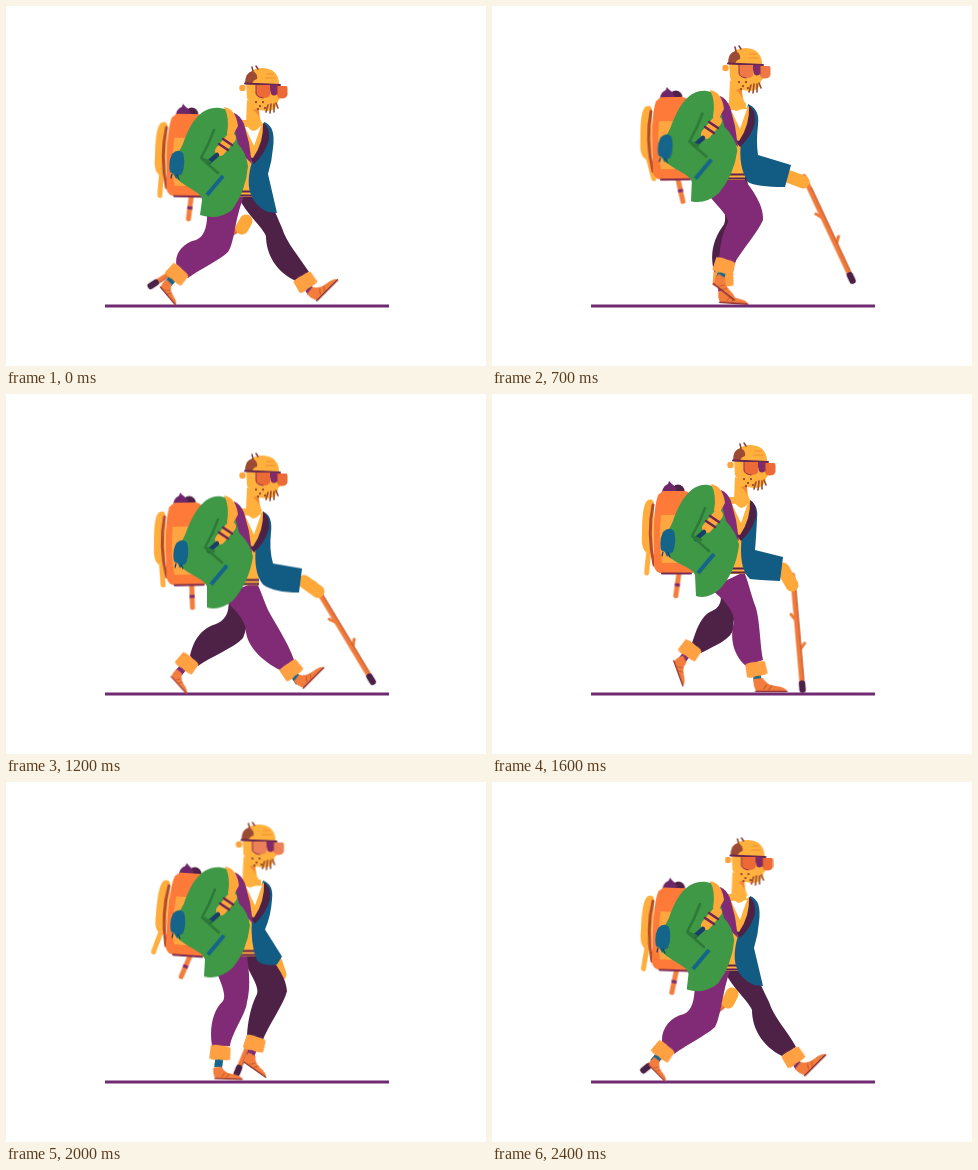
An HTML page without scripts that plays this animation: 480x360 px, repeating every 2500 ms.

```html
<!DOCTYPE html>
<html lang="en">
<head>
<meta charset="utf-8">
<title>Walking hiker</title>
<style>
html, body { margin: 0; width: 100%; height: 100%; overflow: hidden; background: #fff; }
svg { display: block; width: 100vw; height: 100vh; }

/* Motion is held for 100 ms per drawing: steps(n) spans n drawings. */
.a { animation: 2500ms steps(4) infinite; }
.body { animation-name: bob; }
.head { animation-name: head; }
.lens { animation-name: glint; }
.pack { animation-name: pack; transform-origin: 185px 150px; transform: rotate(1deg); }
.strap { animation-name: strap; transform: rotate(6deg); }
.coat { animation-name: coat; }
.trim { animation-name: trim; }
.arm { animation-name: arm; }
.hand { animation-name: hand; }
.cane { animation-name: cane; transform: translate(237px,220px) rotate(57deg); }
.near-leg { animation-name: near-leg; }
.near-cuff { animation-name: near-cuff; transform: translate(171px,268px) rotate(43deg); }
.near-shoe { animation-name: near-shoe; transform: translate(-1px,13px) rotate(7deg) scale(.77); }
.far-leg { animation-name: far-leg; }
.far-cuff { animation-name: far-cuff; transform: translate(299px,276px) rotate(-30deg); }
.far-shoe { animation-name: far-shoe; transform: translate(0,12px) rotate(-15deg) scale(.95); }

@keyframes bob {
  16% { transform: translate(0,-13.5px); animation-timing-function: steps(3); }
  28% { transform: translate(0,-17px); animation-timing-function: steps(2); }
  36% { transform: translate(0,-11px); animation-timing-function: steps(3); }
  48% { transform: translate(0,.5px); }
  64% { transform: translate(1px,-11px); animation-timing-function: steps(2); }
  72% { transform: translate(1px,-15.5px); animation-timing-function: steps(2); }
  80% { transform: translate(1px,-16.5px); }
  96% { transform: translate(0,-2px); animation-timing-function: steps(1); }
}
@keyframes head {
  16% { transform: translate(1px,0); animation-timing-function: steps(3); }
  28% { transform: translate(-3px,-3px); animation-timing-function: steps(2); }
  36% { transform: translate(-3.5px,-2px); animation-timing-function: steps(3); }
  48% { transform: translate(0,-1px); }
  64% { transform: translate(1px,0); }
  80% { transform: translate(-4.5px,-3px); }
  96% { transform: translate(-.5px,-2px); animation-timing-function: steps(1); }
}
@keyframes glint {
  16% { fill: #ec9468; animation-timing-function: steps(5); }
  36% { fill: #f0662f; animation-timing-function: steps(3); }
  48%, 64% { fill: #ec6a35; }
  80% { fill: #ec8058; }
  96% { fill: #ec6a35; animation-timing-function: steps(1); }
}
@keyframes pack {
  16% { transform: rotate(1deg); animation-timing-function: steps(5); }
  36% { transform: translate(-1px,0) rotate(-2deg); animation-timing-function: steps(3); }
  48% { transform: translate(-1px,0) rotate(-1deg); }
  64% { transform: rotate(0deg); }
  80% { transform: rotate(4deg); }
  96% { transform: rotate(2deg); animation-timing-function: steps(1); }
}
@keyframes strap {
  16% { transform: rotate(-5deg); animation-timing-function: steps(5); }
  36% { transform: rotate(-16deg); animation-timing-function: steps(3); }
  48% { transform: rotate(-1deg); }
  64% { transform: rotate(8deg); }
  80% { transform: rotate(19deg); }
  96% { transform: rotate(10deg); animation-timing-function: steps(1); }
}
@keyframes coat {
  16% { d: path("M214,102C194,100 184,118 177,138C170,152 160,162 170,172C180,182 197,186 198,194L196,211Q212,214 226,202Q240,185 243,160Q241,146 232,138L224,104Z"); animation-timing-function: steps(5); }
  36%, 48% { d: path("M215,102C198,100 188,118 180,138C174,152 166,162 175,172C185,182 198,184 201,192L201,213Q213,217 227,206Q243,188 247,162Q245,150 233,138L224,104Z"); animation-timing-function: steps(3); }
  64% { d: path("M215,102C198,100 187,118 180,138C174,152 166,162 174,172C184,182 199,184 202,192L203,213Q214,217 227,206Q243,188 246,162Q244,150 233,138L224,104Z"); }
  80% { d: path("M214,102C194,100 184,118 177,138C170,152 160,162 170,172C180,182 196,186 198,194L197,211Q212,215 226,202Q240,185 243,160Q241,146 232,138L224,104Z"); }
}
@keyframes trim {
  16% { transform: none; animation-timing-function: steps(5); }
  36% { transform: translate(4px,1px); animation-timing-function: steps(3); }
  48%, 64% { transform: translate(4px,1px); }
  80% { transform: none; }
}
@keyframes arm {
  16% { d: path("M256,115Q268,120 267,136Q265,152 261,167L277,194L268,205Q258,206 254,198Q246,179 247,154Z"); animation-timing-function: steps(3); }
  28% { d: path("M256,115Q268,120 266,136Q264,152 266,166L299,176L293,198Q264,198 256,193Q246,178 249,152Z"); animation-timing-function: steps(2); }
  36% { d: path("M256,116Q266,119 265,136Q265,151 270,163L302,166L302,194Q268,193 257,191Q248,176 250,151Z"); animation-timing-function: steps(3); }
  48% { d: path("M256,117Q267,120 265,138Q263,155 267,169L296,174L293,198Q268,198 257,190Q247,178 250,150Z"); }
  64% { d: path("M255,117Q266,121 264,136Q263,156 262,167L290,174L287,198Q265,197 257,196Q245,186 249,151Z"); }
  80% { d: path("M256,115Q267,119 265,134Q264,150 258,164L275,191L270,199Q256,201 250,195Q243,178 245,151Z"); }
  96% { d: path("M258,116Q270,120 267,142Q266,155 262,168L271,206L262,205Q248,199 244,186Q240,172 248,150Z"); animation-timing-function: steps(1); }
}
@keyframes hand {
  16% { d: path("M270,200L270,214"); animation-timing-function: steps(3); }
  28% { d: path("M298,188L311,193"); animation-timing-function: steps(2); }
  36% { d: path("M305,180L320,185"); animation-timing-function: steps(3); }
  48% { d: path("M298,187L312,197"); }
  64% { d: path("M290,186L299,202"); }
  80% { d: path("M269,197L273,209"); }
  96% { d: path("M240,214L236,222"); animation-timing-function: steps(1); }
}
@keyframes cane {
  16% { transform: translate(270px,214px) rotate(44deg); animation-timing-function: steps(3); }
  28% { transform: translate(314px,192px) rotate(-25deg); animation-timing-function: steps(2); }
  36% { transform: translate(320px,186px) rotate(-43deg); animation-timing-function: steps(3); }
  48% { transform: translate(310px,193px) rotate(-31deg); }
  64% { transform: translate(300px,197px) rotate(-5deg); }
  80% { transform: translate(271px,206px) rotate(22deg); }
  96% { transform: translate(237px,221px) rotate(51deg); animation-timing-function: steps(1); }
}
@keyframes near-leg {
  16% { d: path("M208,180C212,200 222,208 218,215C198,222 192,238 196,246L206,257C222,246 244,238 249,228C255,215 245,190 240,165Z"); animation-timing-function: steps(3); }
  28% { d: path("M210,180C222,198 236,208 236,216C230,228 228,240 227,254L242,258C250,244 266,226 271,214C272,200 262,185 246,165Z"); animation-timing-function: steps(2); }
  36% { d: path("M212,194C228,206 251,210 253,221C251,240 256,256 270,264L288,254C284,240 276,222 272,211C266,198 256,186 246,176Z"); animation-timing-function: steps(3); }
  48% { d: path("M214,202C228,214 240,226 240,238C242,254 258,268 274,276L288,266C282,248 268,228 262,216C256,202 254,194 250,188Z"); }
  64% { d: path("M218,194C232,206 242,216 242,228C238,242 240,260 254,272L271,266C268,252 268,228 264,214C258,198 256,186 252,178Z"); }
  80% { d: path("M209,185C214,200 221,212 217,219C207,228 203,246 206,264L224,264C226,250 240,232 241,220C245,205 243,185 240,168Z"); animation-timing-function: steps(2); }
  88% { d: path("M204,190C206,208 208,216 204,222C190,230 184,246 186,260L198,268C208,256 226,244 232,232C238,220 238,200 240,178Z"); animation-timing-function: steps(2); }
  96% { d: path("M202,190C204,212 202,228 192,232C174,236 166,254 172,266L182,272C196,262 216,252 223,245C229,234 230,212 238,188Z"); animation-timing-function: steps(1); }
}
@keyframes near-cuff {
  16% { transform: translate(194px,254px) rotate(38deg); animation-timing-function: steps(3); }
  28% { transform: translate(232px,260px) rotate(18deg); animation-timing-function: steps(2); }
  36% { transform: translate(281px,265px) rotate(-25deg); animation-timing-function: steps(3); }
  48% { transform: translate(285px,276px) rotate(-34deg); }
  64% { transform: translate(264px,275px) rotate(-8deg); }
  80% { transform: translate(214px,270.5px) rotate(7deg); animation-timing-function: steps(2); }
  88% { transform: translate(188px,268px) rotate(30deg); animation-timing-function: steps(2); }
  96% { transform: translate(171px,269px) rotate(40deg); animation-timing-function: steps(1); }
}
@keyframes near-shoe {
  16% { transform: translate(0,12px) rotate(32deg) scale(.88); animation-timing-function: steps(3); }
  28% { transform: translate(0,12px) rotate(20deg) scale(.87); animation-timing-function: steps(2); }
  36% { transform: translate(0,12px) rotate(0deg) scale(1); animation-timing-function: steps(3); }
  48% { transform: translate(0,12px) rotate(-11deg) scale(.93); }
  64% { transform: translate(0,12px) rotate(8deg) scale(1); }
  80% { transform: translate(-1px,17px) rotate(-5deg) scale(.88); animation-timing-function: steps(2); }
  88% { transform: translate(-1px,14px) rotate(2deg) scale(.78); animation-timing-function: steps(2); }
  96% { transform: translate(0,12px) rotate(5deg) scale(.76); animation-timing-function: steps(1); }
}
@keyframes far-leg {
  16% { d: path("M232,166C238,186 252,200 250,214C244,232 244,252 260,270L279,268C276,252 278,236 274,210C272,196 266,180 252,165Z"); }
  32% { d: path("M224,180C228,200 230,212 226,220C214,232 208,248 210,266L228,266C232,250 248,232 250,220C252,205 254,190 256,172Z"); animation-timing-function: steps(1); }
  36% { d: path("M220,185C224,206 225,212 220,216C204,224 198,244 198,258L210,265C220,252 240,242 245,232C248,222 246,200 250,180Z"); animation-timing-function: steps(3); }
  48% { d: path("M222,200C224,215 222,225 210,230C190,236 186,254 184,262L192,272C206,262 228,254 237,244C242,234 242,215 250,190Z"); }
  64% { d: path("M226,196C232,204 228,214 220,217C208,222 204,238 200,249L209,259C222,252 238,246 241,236C242,220 246,200 250,180Z"); }
  80% { d: path("M236,172C242,190 254,204 251,212C244,226 242,240 241,253L257,258C262,244 278,222 281,209C280,196 272,184 258,168Z"); animation-timing-function: steps(2); }
  88% { d: path("M228,178C240,200 258,210 262,220C260,238 270,258 286,268L302,258C296,244 286,226 282,216C274,200 264,188 256,176Z"); animation-timing-function: steps(2); }
  96% { d: path("M232,188C240,206 256,218 260,228C260,246 270,264 290,274L304,265C296,250 281,234 277,220C268,202 264,190 256,182Z"); animation-timing-function: steps(1); }
}
@keyframes far-cuff {
  16% { transform: translate(270px,275px) rotate(-8deg); }
  32% { transform: translate(218px,272px) rotate(8deg); animation-timing-function: steps(1); }
  36% { transform: translate(197.5px,266.5px) rotate(28deg); animation-timing-function: steps(3); }
  48% { transform: translate(181px,269px) rotate(40deg); }
  64% { transform: translate(198px,256px) rotate(38deg); }
  80% { transform: translate(248.5px,261.5px) rotate(18deg); animation-timing-function: steps(2); }
  88% { transform: translate(296px,266px) rotate(-26deg); animation-timing-function: steps(2); }
  96% { transform: translate(301px,275px) rotate(-30deg); animation-timing-function: steps(1); }
}
@keyframes far-shoe {
  16% { transform: translate(0,12px) rotate(8deg) scale(1); }
  32% { transform: translate(0,15px) rotate(-3deg) scale(.88); animation-timing-function: steps(1); }
  36% { transform: translate(-2px,15px) rotate(4deg) scale(.8); animation-timing-function: steps(3); }
  48% { transform: translate(-1px,13px) rotate(8deg) scale(.74); }
  64% { transform: translate(0,12px) rotate(32deg) scale(.85); }
  80% { transform: translate(0,13px) rotate(17deg) scale(.85); animation-timing-function: steps(2); }
  88% { transform: translate(0,12px) rotate(-4deg) scale(1); animation-timing-function: steps(2); }
  96% { transform: translate(0,12px) rotate(-15deg) scale(.95); animation-timing-function: steps(1); }
}
</style>
</head>
<body>
<svg viewBox="0 0 480 360" fill="none" stroke-linecap="round" stroke-linejoin="round">
  <defs>
    <g id="cuff">
      <path d="M-10,-6Q-4,-8 1,-7Q7,-8 10,-6L11,6Q5,8 0,7Q-6,9 -10,7Z" fill="#ffa143"/>
    </g>
    <g id="shoe">
      <path d="M-4,-2L5,-3Q9,4 18,5Q28,6 30,11L-1,11Q-5,5 -4,-2Z" fill="#f27d3c"/>
      <path d="M-2,10.5H29" stroke="#8b3038" stroke-width="1.5"/>
      <path d="M9,4L6,8M14,5L11,9" stroke="#b54a2b"/>
    </g>
  </defs>

  <path d="M99,300H383" stroke="#712b73" stroke-width="3.2" stroke-linecap="butt"/>

  <g class="a body">
    <g class="a cane">
      <path d="M0,-5V104" stroke="#ef7a3a" stroke-width="5"/>
      <path d="M-1,40L-5,34M1,70L6,64" stroke="#ef7a3a" stroke-width="3"/>
      <path d="M2,8V100" stroke="#c4552d"/>
      <path d="M0,104V110" stroke="#4c2147" stroke-width="6.5"/>
    </g>
    <path class="a hand" d="M240,215L236,222" stroke="#ffa83a" stroke-width="13"/>
  </g>

  <path class="a far-leg" fill="#4e2147" d="M232,190C240,208 256,220 260,230C260,248 270,266 290,275L303,266C294,252 280,236 276,222C268,204 264,192 256,184Z"/>
  <g class="a far-cuff">
    <path d="M0,6V13" stroke="#7c2a72" stroke-width="8" stroke-linecap="butt"/>
    <use href="#shoe" class="a far-shoe"/>
    <use href="#cuff"/>
  </g>

  <path class="a near-leg" fill="#812a75" d="M200,195C203,215 200,230 190,234C172,238 165,256 174,266L182,272C196,262 214,254 222,246C229,236 228,215 238,190Z"/>
  <g class="a near-cuff">
    <path d="M0,6V15" stroke="#15658a" stroke-width="8" stroke-linecap="butt"/>
    <use href="#shoe" class="a near-shoe"/>
    <use href="#cuff"/>
  </g>

  <g class="a body">
    <g class="a pack">
      <g transform="translate(186 190)">
        <g class="a strap">
          <path d="M0,0V23" stroke="#f27d3c" stroke-width="5"/>
          <path d="M-2.5,12H2.5" stroke="#7c2a72" stroke-width="3" stroke-linecap="butt"/>
        </g>
      </g>
      <g transform="translate(156 166)">
        <path class="a strap" d="M0,0L1,24" stroke="#ffad3d" stroke-width="5"/>
      </g>
      <path d="M155,117Q161,115 161,122L160,170Q155,172 151,167Q148,162 149,150Q149,120 155,117Z" fill="#ffad3d"/>
      <path d="M160,122Q154,150 161,182" stroke="#b44b2c" stroke-width="3"/>
      <circle cx="185" cy="108" r="6.500" fill="#4e2147"/>
      <path d="M169,109Q170,103 175,101L176,98L179,101Q184,104 184,110Z" fill="#6d2668"/>
      <path d="M170,108H192Q200,110 200,120V190H167Q160,188 161,178Q159,130 165,112Z" fill="#fd7a38"/>
      <path d="M168,132H190V180H169Q165,160 168,132Z" fill="#ffa640"/>
      <path d="M169,190.500H198" stroke="#7c2a50" stroke-width="2"/>
    </g>

    <!-- shirt, far side of the coat -->
    <path d="M230,114L254,114L253,191H229Z" fill="#ffb03d"/>
    <path d="M229,185.500H253M229,189.500H253" stroke="#5d2350" stroke-width="1.800" stroke-linecap="butt"/>
    <path class="a arm" fill="#125c84" d="M258,116Q270,120 267,142Q266,155 262,168L271,207L262,206Q248,200 244,186Q240,172 248,150Z"/>
    <path d="M257,117Q264,120 263,134Q259,148 248,158L244,153Q254,144 257,117Z" fill="#4e2147"/>
    <path d="M250,122L257,117Q258,136 247,152L242,150Z" fill="#ffb03d"/>
    <path d="M239,121L255,120L248,140Z" fill="#fff"/>

    <g class="a head">
      <path d="M241,94L253,100Q253,112 256,117Q253,124 247,125Q241,122 240,117Z" fill="#ffb03d"/>
      <path d="M247,104Q252,108 253,112L253,102Z" fill="#f58a34"/>
      <path d="M240,74Q243,62 257,62Q272,63 273,77L274,86Q276,92 272,95Q271,105 260,105Q246,104 241,92Z" fill="#ffb03d"/>
      <path d="M239,78Q239,66 247,65Q252,68 251,73Q247,74 246,78Z" fill="#9b4a33"/>
      <path d="M247,65L246,61M252,63L250,60" stroke="#8c3c3c" stroke-width="1.500"/>
      <path d="M261,68H267M260,72H269" stroke="#f18c32"/>
      <circle cx="236.500" cy="82" r="3.200" fill="#ffa23a"/>
      <path d="M239,77.500L274,79" stroke="#67264f" stroke-width="2"/>
      <path d="M263,79H271V88Q268,91 265,88Z" fill="#802b68"/>
      <g class="a lens" fill="#ec6a35">
        <path d="M250,79H264V89Q263,92 257,92Q250,91 250,87Z"/>
        <path d="M271,80H280Q281.500,80 281.500,83V89Q280,93 275,92.500Q271,92 271,88Z"/>
      </g>
      <path d="M250,79V87Q250,91 257,92M271,80V88" stroke="#8b3050"/>
      <path d="M250,96v.1M254,100v.1M257,96v.1M252,103v.1M259,102v.1" stroke="#8b4430" stroke-width="2.200"/>
      <path d="M262,99L260,106M265,98L264,107M268,98V106M270,97L272,102" stroke="#9b4a2c" stroke-width="1.600"/>
    </g>

    <!-- near side of the coat and arm -->
    <path d="M228,107Q234,109 238,118L243,137L246,158L228,140Z" fill="#812a75"/>
    <path class="a coat" fill="#3f9846" d="M214,102C194,100 184,118 177,138C170,152 160,162 170,172C180,182 196,186 196,194L194,209Q212,215 226,204Q240,185 242,160Q240,146 232,138L224,104Z"/>
    <path d="M218,101Q230,103 232,120L226,131L221,128Q224,112 218,101Z" fill="#ffa83a"/>
    <path d="M225,132L214,145" stroke="#ffa83a" stroke-width="10"/>
    <path d="M217,133L226,139M213,138L222,144" stroke="#6b2456" stroke-width="2.500"/>
    <path d="M203,156L211,149" stroke="#173f68" stroke-width="4.500"/>
    <g class="a trim">
      <path d="M208,124Q203,138 195,152L204,156M196,153L212,167" stroke="#2d7a38" stroke-width="2.500"/>
      <path d="M201,189L217,170" stroke="#15658a" stroke-width="4" stroke-linecap="butt"/>
      <path d="M166,148Q172,142 177,147Q180,158 176,168L172,170L170,173L168,168L164,166Q162,156 166,148Z" fill="#15658a"/>
      <path d="M166,168L165,172M171,169L173,173" stroke="#173f68" stroke-width="1.200"/>
    </g>
  </g>
</svg>
</body>
</html>
```
